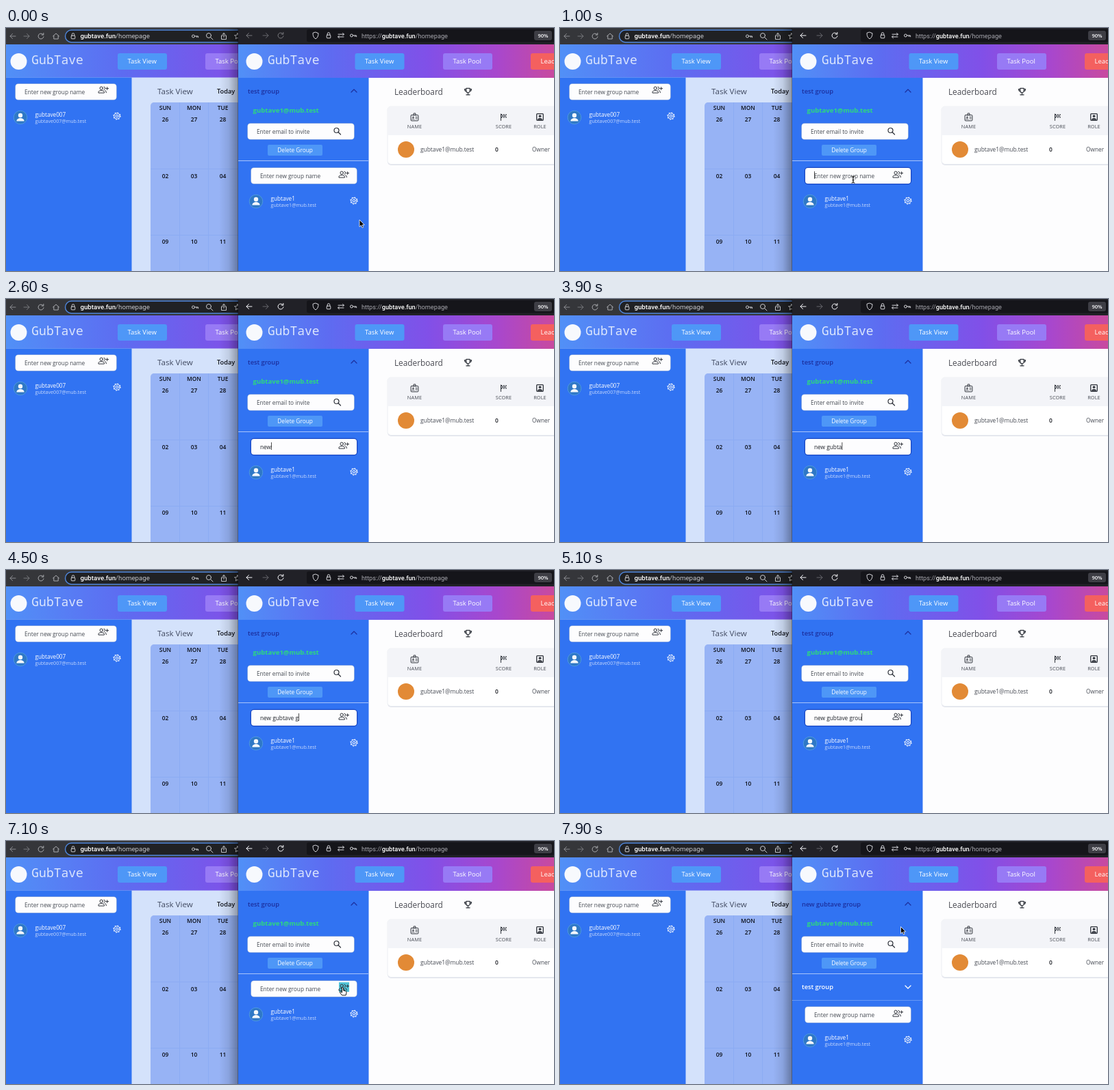
An HTML page that plays this animation: 800 by 356 pixels, repeating every 8000 ms.

```html
<!DOCTYPE html>
<html lang="en">
<head>
<meta charset="utf-8">
<title>Task groups</title>
<style>
  html, body { margin: 0; width: 100%; height: 100%; overflow: hidden; background: #fff; }
  svg { display: block; width: 800px; height: 356px; }
  text { font-family: "Open Sans", "Noto Sans", sans-serif; white-space: pre; }
  .url { font-family: Roboto, "Liberation Sans", sans-serif; }
  .brand { font-family: "Noto Sans Mono", "DejaVu Sans Mono", monospace; }
  .line { fill: none; stroke-linecap: round; stroke-linejoin: round; }
</style>
</head>
<body>
<svg id="stage" viewBox="0 0 800 356" xmlns="http://www.w3.org/2000/svg"></svg>
<script>
const LOOP = 8000;
const BLUE = '#3173f2', BUTTON = '#4e97f7', NAVY = '#1c2f9d', INK = '#2f333b';
const EDGE = '#b4c0d6', FOCUS_EDGE = '#1b49c4';
const BRAND = 'GubTave', SITE = 'gubtave.fun', MAIL = '@mub.test';
const stage = document.getElementById('stage');

const text = (x, y, size, str, fill = '#fff', attrs = '') =>
  `<text x="${x}" y="${y}" font-size="${size}" fill="${fill}" ${attrs}>${str}</text>`;
const rect = (x, y, w, h, fill, r = 0, attrs = '') =>
  `<rect x="${x}" y="${y}" width="${w}" height="${h}" rx="${r}" fill="${fill}" ${attrs}/>`;
const icon = (id, x, y, color, attrs = '') =>
  `<use href="#${id}" x="${x}" y="${y}" stroke="${color}" color="${color}" ${attrs}/>`;
const SEMI = 'font-weight="600"', MED = 'font-weight="500"', MID = 'text-anchor="middle"';

const button = (x, label, fill) =>
  rect(x, 37, 72, 24, fill, 3) + text(x + 14.5, 52.3, 9.5, label, '#fff', MED);

const header = (x, bottom, w, fill, logoX, nameX) =>
  rect(x, 24, w, bottom - 24, fill) +
  `<circle cx="${logoX}" cy="49" r="12" fill="#f7f9fd"/>` +
  text(nameX, 52.5, 18, BRAND, '#dce6fd', 'class="brand"');

// the stroke lies under the fill, so only its outer half shows
const input = (x, y, w, label, id = '') =>
  rect(x, y, w, 23, '#fdfdfe', 4, `paint-order="stroke" stroke="${EDGE}" stroke-width="1.2" ${id && `id="${id}"`}`) +
  text(x + 13, y + 14.6, 8.3, label, '#454a52', id && `id="${id}Text"`);

const profile = (x, y, name) =>
  `<g transform="translate(${x} ${y})">
    <circle r="9.8" fill="#2f78c6" stroke="#4c97e2" stroke-width="1"/>
    <circle cy="-3" r="3.2" fill="#f3f7fc"/>
    <path d="M-5.6 5.4C-5.6-.6 5.6-.6 5.6 5.4Z" fill="#f3f7fc"/>
  </g>` +
  text(x + 21.5, y - .8, 8.2, name, '#fff', MED) +
  text(x + 21.5, y + 8.4, 7.1, name + MAIL, '#c6d8fc');

const url = (x, size, prefix, tint) =>
  text(x, 15.3, size, `${prefix}<tspan fill="#fff" ${MED}>${SITE}</tspan>/homepage`, tint, 'class="url"');

const defs = `<defs>
  <linearGradient id="barL"><stop stop-color="#5190f7"/><stop offset=".5" stop-color="#5d6cf1"/>
    <stop offset="1" stop-color="#8150e8"/></linearGradient>
  <linearGradient id="barR"><stop stop-color="#5190f7"/><stop offset=".28" stop-color="#5d6cf1"/>
    <stop offset=".6" stop-color="#8150e8"/><stop offset=".82" stop-color="#a847cd"/>
    <stop offset="1" stop-color="#c84a9f"/></linearGradient>
  <linearGradient id="shade"><stop stop-color="#000" stop-opacity="0"/>
    <stop offset=".5" stop-color="#000" stop-opacity=".09"/>
    <stop offset="1" stop-color="#000" stop-opacity=".34"/></linearGradient>
  <clipPath id="clipL"><rect width="339" height="356"/></clipPath>
  <g id="back" class="line"><path d="M4 0H-4M-.5-3.6L-4 0L-.5 3.6"/></g>
  <g id="forward" class="line"><path d="M-4 0H4M.5-3.6L4 0L.5 3.6"/></g>
  <g id="reload" class="line"><path d="M3.4-2.2A4 4 0 1 0 4 .8M3.8-4.6V-1.9H1.1"/></g>
  <g id="home" class="line"><path d="M-4.5 0L0-4L4.5 0M-3.2-.8V4H3.2V-.8"/></g>
  <g id="lock" class="line"><rect x="-2.8" y="-.8" width="5.6" height="4.6" rx=".8"/>
    <path d="M-1.8-.8V-2.5A1.8 1.8 0 0 1 1.8-2.5V-.8"/></g>
  <g id="key" class="line"><circle cx="-2.5" r="2"/><path d="M-.4 0H4.6V1.8M2.6 0V1.6"/></g>
  <g id="search" class="line"><circle cx="-1" cy="-1" r="3.5"/><path d="M1.5 1.5L5 5"/></g>
  <g id="share" class="line"><path d="M-1.6-1H-3.5V4.5H3.5V-1H1.6M0 1.5V-4.5M-2-2.6L0-4.6L2-2.6"/></g>
  <g id="star" class="line"><path d="M0-4.5L1.3-1.5L4.5-1.3L2 .9L2.8 4L0 2.3L-2.8 4L-2 .9L-4.5-1.3L-1.3-1.5Z"/></g>
  <g id="shield" class="line"><path d="M0-4.8L4-3.3C4 1 2.7 3.5 0 4.9C-2.7 3.5-4 1-4-3.3Z"/></g>
  <g id="swap" class="line"><path d="M-4-1.8H4.4M2.6-3.6L4.4-1.8L2.6 0M4 2H-4.4M-2.6 .2L-4.4 2L-2.6 3.8"/></g>
  <g id="people" class="line"><circle cx="-2.8" cy="-2.3" r="2.2"/>
    <path d="M-7 4.2V3.2C-7 .4 1.4 .4 1.4 3.2V4.2ZM1-4.4A2.2 2.2 0 0 1 1-.2M2.6 1Q4.6 1.7 4.4 4.2M3.8-1.9H7.6M5.7-3.8V0"/></g>
  <g id="gear" class="line"><circle r="1.8"/><circle r="4.2"/>
    <circle r="5" stroke-width="1.2" stroke-dasharray="1.6 2.33" stroke-linecap="butt"/></g>
  <g id="up" class="line"><path d="M-4 2L0-2L4 2"/></g>
  <g id="down" class="line"><path d="M-4-2L0 2L4-2"/></g>
  <g id="trophy" class="line"><path d="M-2.7-4.6H2.7V-1A2.7 2.7 0 0 1-2.7-1ZM-2.7-3.4H-5Q-5-.3-2.5-.3M2.7-3.4H5Q5-.3 2.5-.3M0 1.8V4.6M-2.6 4.8H2.6"/></g>
  <g id="badge" class="line"><rect x="-5.4" y="-3" width="10.8" height="8.4" rx="1"/>
    <path d="M-1.4-2.4V-5.5H1.4V-2.4M1.6 0H3.6M1.6 2.4H3.6"/>
    <circle cx="-2.2" cy=".3" r=".8"/><path d="M-3.8 3.2Q-2.2 1.2-.6 3.2"/></g>
  <g id="flag" class="line"><path d="M-4-4.5V5"/>
    <path d="M-3.5-3.4H4.2M-3.5 .2H4.2M-2-1.6H4.2" stroke-width="1.8" stroke-dasharray="1.6 1.5" stroke-linecap="butt"/></g>
  <g id="card" class="line"><rect x="-4.8" y="-4.8" width="9.6" height="9.6" rx="1" stroke-width="1.3"/>
    <g fill="currentColor"><circle cy="-1.3" r="1.4"/><path d="M-3.2 3.4Q0 .2 3.2 3.4Z"/></g></g>
</defs>`;

const days = ['SUN', 'MON', 'TUE'].map((day, i) => {
  const x = 232.5 + i * 42;
  const labels = [day, 26 + i, '0' + (2 + i), String(9 + i).padStart(2, '0')];
  return labels.map((label, row) =>
    text(x, [120.3, 136.8, 219.6, 316.4][row], 8.4, label, '#0b0e16', `${MID} ${SEMI}`)).join('');
}).join('');

const leftWindow = `<g clip-path="url(#clipL)">` +
  rect(0, 0, 339, 24, '#35363a') +
  icon('back', 10, 12, '#8d8e93') + icon('forward', 30, 12, '#77787d') +
  icon('reload', 51, 12, '#a9aaae') + icon('home', 73, 12, '#a9aaae') +
  rect(86.5, 3, 300, 18, '#202124', 9, 'stroke="#4f86dc" stroke-width="1.4"') +
  icon('lock', 98, 12, '#c9cace', 'fill="#c9cace"') + url(108.5, 9.7, '', '#c3c5ca') +
  icon('key', 276, 12, '#c9cace') + icon('search', 297, 12, '#c9cace') +
  icon('share', 318, 12, '#c9cace') + icon('star', 338, 12, '#c9cace') +
  header(0, 73, 339, 'url(#barL)', 18.5, 37.3) +
  button(163, 'Task View', BUTTON) + button(291, 'Task Pool', '#977af5') +
  rect(0, 72.5, 339, 284, '#d4e2fb') + rect(0, 72.5, 183.5, 284, BLUE) +
  input(14, 82, 147, 'Enter new group name') + icon('people', 142, 90.5, INK) +
  profile(21, 131, BRAND.toLowerCase() + '007') + icon('gear', 162, 129, '#fff') +
  text(221, 96.6, 11.6, 'Task View', '#414a61') + text(308, 96.4, 9.2, 'Today', '#0d1018', SEMI) +
  rect(211, 109, 150, 260, '#97b3f5', 5) +
  `<path d="M253.5 109V356M295.5 109V356M211 206.5H339M211 303.5H339" stroke="#8babf3"/>` +
  days + rect(311, 0, 28, 356, 'url(#shade)') + rect(338, 0, 1, 356, '#000', 0, 'opacity=".25"') + `</g>`;

const account = `<g id="account">` +
  input(358, 205, 154, '', 'field') +
  rect(371, 210, .8, 11, '#222', 0, 'id="caret"') +
  rect(486, 207, 15, 14, '#52c3d6', 0, 'id="picked"') +
  icon('people', 493, 214.5, INK) +
  profile(365, 254, BRAND.toLowerCase() + '1') + icon('gear', 508, 253, '#fff') + `</g>`;

const nextGroup = `<g id="nextGroup">` +
  text(353, 217.4, 9.3, 'test group', '#fff', SEMI) + icon('down', 508, 214, '#fff', 'stroke-width="1.3"') +
  `<path d="M339 233.5H529" stroke="#9dbdf9" stroke-dasharray="1 1"/></g>`;

const column = (x, id, label) =>
  icon(id, x, 130.5, INK) + text(x, 147, 7.4, label, '#4a4e57', MID + ' letter-spacing=".1"');

const rightWindow =
  rect(339, 0, 461, 24, '#212127') + rect(439, 2, 380, 18.5, '#15151a', 3) +
  `<g id="nav">` + icon('back', 355, 11, '#fbfbfe') + icon('reload', 401, 11, '#fbfbfe') + `</g>` +
  icon('forward', 379, 11, '#66666d') +
  icon('shield', 452, 11, '#d5d5da') + icon('lock', 471, 11, '#d5d5da') +
  icon('swap', 489, 11, '#d5d5da') + icon('key', 507, 11, '#d5d5da') +
  url(519, 9.2, 'https://', '#a6a6ad') +
  rect(771, 4, 26, 14, '#3e3e45', 3) + text(784, 13.8, 7.6, '90%', '#fbfbfe', MID + ' ' + SEMI) +
  header(339, 73, 461, 'url(#barR)', 362.5, 382) +
  button(509.5, 'Task View', BUTTON) + button(638, 'Task Pool', '#977af5') +
  button(766, 'Leaderboard', '#f4605f') +
  rect(339, 73, 461, 283, '#fdfdfe') + rect(339, 73, 190.5, 283, BLUE) +
  text(353, 95.7, 9.3, '', NAVY, SEMI + ' id="openGroup"') + icon('up', 508, 92, NAVY, 'stroke-width="1.2"') +
  text(360.5, 124.2, 9.6, BRAND.toLowerCase() + '1' + MAIL, '#2ddb7c', 'font-weight="700"') +
  input(353, 140, 155, 'Enter email to invite') + icon('search', 483.5, 151, INK, 'stroke-width="1.2"') +
  rect(382, 171, 80, 16, BUTTON, 2) + text(422, 182.2, 8.3, 'Delete Group', '#fff', MID + ' ' + MED) +
  `<path d="M339 194.5H529" stroke="#a9c4fa"/>` + nextGroup + account +
  text(567, 97.8, 11.8, 'Leaderboard', '#4a4b53') + icon('trophy', 674.5, 93, INK, 'stroke-width="1.2"') +
  rect(557, 116.5, 260, 84.5, '#dfe2ea', 5) + rect(557, 115, 260, 84.5, '#fff', 5, 'stroke="#eceef3"') +
  `<path d="M557 157V120Q557 115 562 115H800V157Z" fill="#f3f4f8"/>` +
  column(596.5, 'badge', 'NAME') + column(726.5, 'flag', 'SCORE') + column(779.5, 'card', 'ROLE') +
  `<circle cx="584" cy="178" r="12" fill="#e28a36"/>` +
  text(605, 181, 8.35, BRAND.toLowerCase() + '1' + MAIL, '#464a53') +
  text(714, 181, 8.4, '0', '#17191f', SEMI) + text(768, 181, 8.3, 'Owner', '#464a53');

const pointers = `<g id="pointer">
  <path id="arrow" d="M0 0V10.2L2.4 8L4 11.6L5.7 10.8L4.1 7.4H7.2Z" fill="#000" stroke="#fff" stroke-width=".8"/>
  <path id="beam" class="line" d="M-2-5Q0-5 0-3.6Q0-5 2-5M0-3.6V3.6M-2 5Q0 5 0 3.6Q0 5 2 5M-1 .8H1" stroke="#000"/>
  <path id="hand" d="M-1 0Q0-1.2 1 0V4L4.8 5Q5.8 5.4 5.5 7L4.6 11H-1L-4 7Q-4.4 5.6-3 5.8L-1 7Z" fill="#fff" stroke="#000" stroke-width=".9"/>
</g>`;

stage.innerHTML = defs + leftWindow + rightWindow + pointers;

const $ = id => document.getElementById(id);
const show = (id, on) => $(id).setAttribute('visibility', on ? 'visible' : 'hidden');
const setText = (id, str) => { if ($(id).textContent !== str) $(id).textContent = str; };

const NAME = `new ${BRAND.toLowerCase()} group`;
const KEYS = [2100, 2300, 2500, 2700, 2900, 3100, 3300, 3600, 3800,
  4000, 4200, 4400, 4500, 4700, 4900, 5000, 5200];
const FOCUS = 700, WAKE = 5500, SUBMIT = 6700, ADDED = 7400;
// time, x, y
const PATH = [[0, 516, 281], [200, 516, 281], [700, 428, 222], [WAKE, 428, 222],
  [6300, 491.5, 215], [7200, 491.5, 215], [7700, 497.5, 125.5], [LOOP, 497.5, 125.5]];

function pointerAt(t) {
  const i = PATH.findIndex(p => p[0] > t);
  const [t0, x0, y0] = PATH[i - 1], [t1, x1, y1] = PATH[i];
  const p = (t - t0) / (t1 - t0), e = p * p * (3 - 2 * p);
  return [x0 + (x1 - x0) * e, y0 + (y1 - y0) * e];
}

function draw(t) {
  const focused = t >= FOCUS && t < SUBMIT;
  const typed = t < SUBMIT ? NAME.slice(0, KEYS.filter(k => k <= t).length) : '';
  const added = t >= ADDED;

  $('nav').setAttribute('opacity', t < FOCUS ? .4 : 1);
  $('field').setAttribute('stroke', focused ? FOCUS_EDGE : EDGE);
  $('field').setAttribute('stroke-width', focused ? 2.6 : 1.2);
  setText('fieldText', typed || 'Enter new group name');
  $('fieldText').setAttribute('fill', typed ? '#1f2228' : '#454a52');
  $('caret').setAttribute('x', 371 + (typed ? $('fieldText').getComputedTextLength() : 0));
  const busy = t >= KEYS[0] && t < KEYS[16] + 500;
  show('caret', focused && (busy || (t - FOCUS) % 1000 < 500));
  show('picked', t >= SUBMIT && !added);

  setText('openGroup', added ? NAME : 'test group');
  show('nextGroup', added);
  $('account').setAttribute('transform', `translate(0 ${added ? 38 : 0})`);

  const [x, y] = pointerAt(t);
  const inside = x < 512 && y > 205 && y < 228;
  const shape = !inside ? 'arrow' : x > 484 ? 'hand' : 'beam';
  const awake = t < KEYS[0] || t >= WAKE;
  $('pointer').setAttribute('transform', `translate(${x} ${y})`);
  for (const id of ['arrow', 'beam', 'hand']) show(id, awake && id === shape);
}

const start = performance.now();
function tick() {
  const t = (performance.now() - start) % LOOP;
  draw(Math.floor(t / 100) * 100);
  requestAnimationFrame(tick);
}
tick();
</script>
</body>
</html>
```
